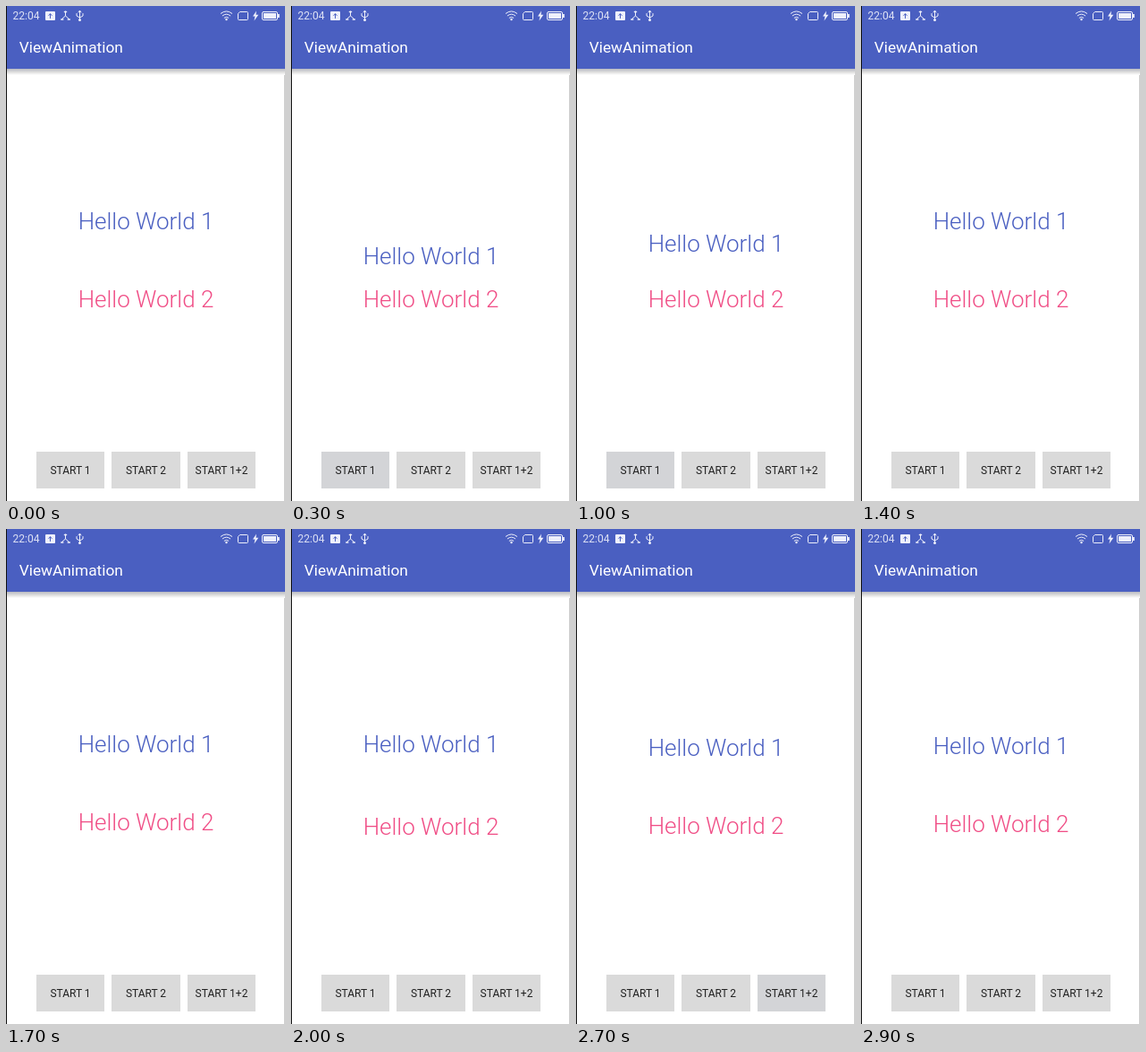
An HTML page for the animation above (3 s loop, 312 by 552 pixels).

```html
<!DOCTYPE html>
<html>
<head>
<meta charset="utf-8">
<style>
  html, body { margin: 0; width: 100%; height: 100%; overflow: hidden; background: #fff; }
  svg { display: block; width: 312px; height: 552px; font-family: Roboto, sans-serif; }
  .icon { fill: none; stroke: #eef0fb; stroke-width: 1; stroke-linecap: round; stroke-linejoin: round; }
  .solid { fill: #eef0fb; stroke: none; }
  .hello { font-size: 26px; font-weight: 300; text-anchor: middle; }
  .button rect { fill: #dadada; }
  .button.pressed rect { fill: #d3d4d7; }
  .button text { font-size: 12px; text-anchor: middle; fill: #222; }
</style>
</head>
<body>
<svg viewBox="0 0 312 552">
  <defs>
    <linearGradient id="shadow" x2="0" y2="1">
      <stop offset="0" stop-color="#b9bac2"/>
      <stop offset=".5" stop-color="#dcdcdc"/>
      <stop offset="1" stop-color="#fff"/>
    </linearGradient>
  </defs>
  <rect width="312" height="552" fill="#fff"/>
  <rect x="311" y="70" width="1" height="482" fill="#ccc"/>
  <rect y="70" width="312" height="7" fill="url(#shadow)"/>
  <rect width="312" height="70" fill="#4a5fc1"/>
  <rect width="1" height="552" fill="#111"/>

  <text x="7.5" y="15" font-size="12.1" fill="#dde1f4">22:04</text>
  <text x="14.7" y="52" font-size="17.3" fill="#fff">ViewAnimation</text>

  <g class="icon">
    <rect class="solid" x="44" y="6" width="11" height="10" rx="1"/>
    <path d="M49.5 13.5V9M47.8 10.5L49.5 8.7L51.2 10.5" stroke="#4a5fc1"/>
    <path d="M66.5 6V11L62.5 14.5M66.5 11L70.5 14.5"/>
    <path d="M65.5 6.5h2M61.8 15h2M69.3 15h2" stroke-width="1.6"/>
    <path d="M82.5 5.5V15M79 8.5V11L82.5 13L86 11V8.5M81 7L82.5 5L84 7"/>
    <circle class="solid" cx="82.5" cy="15.5" r="1.5"/>
    <path d="M240.3 8.3Q246.5 3.3 252.7 8.3M242.2 10.8Q246.5 7.3 250.8 10.8M244.2 13.1Q246.5 11.3 248.8 13.1"/>
    <circle class="solid" cx="246.5" cy="15" r="1.2"/>
    <path d="M262 6.5H269.5Q270.5 6.5 270.5 7.5V14.5Q270.5 15.5 269.5 15.5H260.5Q259.5 15.5 259.5 14.5V9Z"/>
    <path class="solid" d="M280 5.5L276 11.5H278.5L277.500 16.500L282.300 9.800H279.500Z"/>
    <rect x="286.5" y="6.500" width="17" height="9" rx="1.500"/>
    <rect class="solid" x="288" y="8" width="14" height="6"/>
    <rect class="solid" x="304" y="9" width="1.800" height="4"/>
  </g>

  <text class="hello" x="156.5" y="249" fill="#4a5fc1">Hello World 1</text>
  <text class="hello" x="156.5" y="336" fill="#f04e86">Hello World 2</text>

  <g class="button"><rect x="34" y="497" width="76" height="41"/><text x="72" y="522">START 1</text></g>
  <g class="button"><rect x="118" y="497" width="77" height="41"/><text x="156.5" y="522">START 2</text></g>
  <g class="button"><rect x="203" y="497" width="76" height="41"/><text x="241" y="522">START 1+2</text></g>
</svg>
<script>
  const LOOP = 3000, STEP = 100, DURATION = 400, DROP = 53;
  const taps = [
    { at: 236, button: 0, moves: [0] },
    { at: 908, button: 0, moves: [0] },
    { at: 1748, button: 1, moves: [1] },
    { at: 2565, button: 2, moves: [0, 1] }
  ];
  const labels = document.querySelectorAll('.hello');
  const buttons = document.querySelectorAll('.button');
  const start = performance.now();

  // Bounce easing: reaches 1, then rebounds three times with shrinking height.
  function bounce(u) {
    const t = u * 1.1226;
    if (t < 0.3535) return 8 * t * t;
    if (t < 0.7408) return 8 * (t - 0.54719) ** 2 + 0.7;
    if (t < 0.9644) return 8 * (t - 0.8526) ** 2 + 0.9;
    return 8 * (t - 1.0435) ** 2 + 0.95;
  }

  function draw(now) {
    const loopTime = Math.max(0, now - start) % LOOP;
    const time = Math.floor(loopTime / STEP) * STEP;
    const offsets = [0, 0], pressed = [false, false, false];
    for (const { at, button, moves } of taps) {
      const u = (time - at) / DURATION;
      if (u < 0 || u >= 1) continue;
      for (const i of moves) offsets[i] = Math.round(DROP * (1 - bounce(u)));
      if (u < 0.5) pressed[button] = true;
    }
    labels.forEach((label, i) => label.setAttribute('transform', `translate(0 ${offsets[i]})`));
    buttons.forEach((button, i) => button.classList.toggle('pressed', pressed[i]));
    requestAnimationFrame(draw);
  }
  draw(start);
</script>
</body>
</html>
```
